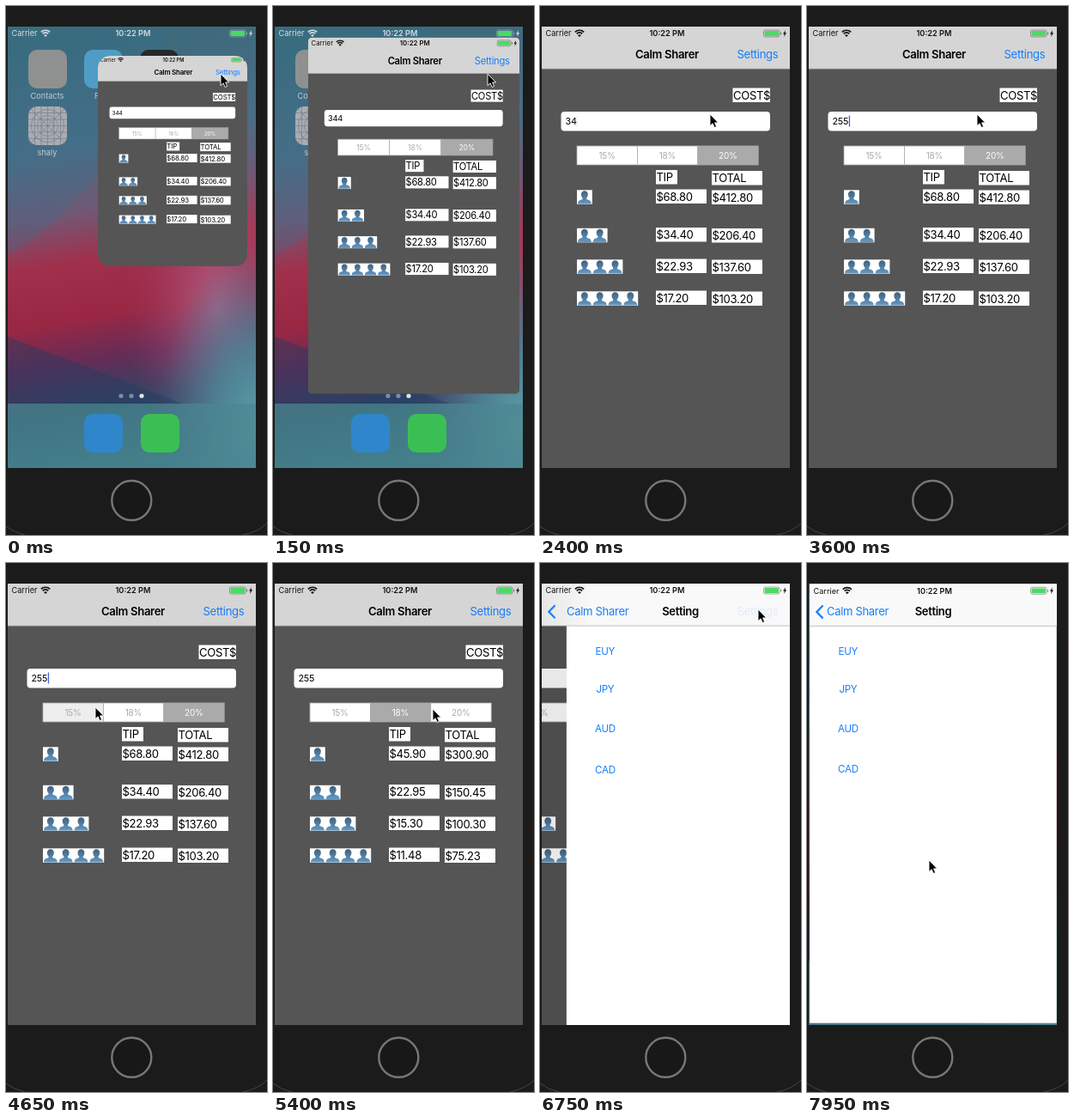
Animation of 304 by 616 pixels, one loop 8000 ms. Source, as an HTML page:

```html
<!DOCTYPE html>
<html lang="en">
<head>
<meta charset="utf-8">
<title>Tip calculator demo</title>
<style>
html, body { margin: 0; width: 100%; height: 100%; overflow: hidden; background: #1b1b1b; }
svg { display: block; width: 304px; height: 616px; }
text { font-family: Inter, Roboto, "Liberation Sans", sans-serif; font-size: 13.1px; letter-spacing: -.025em; white-space: pre; }
.small { font-size: 9.2px; letter-spacing: 0; }
.bold { font-weight: 600; }
.mid { text-anchor: middle; }
.seg { font-size: 10px; }
.entry { font-size: 10.8px; }
.link { fill: #157efb; }
.button { font-size: 11.6px; }
</style>
</head>
<body>
<svg id="stage" viewBox="0 0 304 616" xmlns="http://www.w3.org/2000/svg"></svg>
<script>
const LOOP = 8000, STEP = 150;
const APP = "Calm Sharer";

// time, x, y of the pointer tip
const POINTER = [
  [0, 250, 79], [450, 246, 84], [600, 230, 103], [750, 207, 128], [900, 196, 140],
  [1050, 195, 139], [1200, 196, 138], [1500, 197, 136], [1650, 199, 130], [1800, 198, 126],
  [4200, 150, 150], [4350, 104, 168], [4950, 122, 169], [5100, 146, 170], [5400, 186, 170],
  [5550, 214, 170], [5850, 217, 163], [6000, 231, 120], [6150, 249, 74], [6300, 254, 54],
  [6900, 250, 115], [7050, 216, 300], [7200, 172, 480], [7350, 146, 564], [7500, 143, 571],
  [7800, 145, 540], [7950, 142, 346]
];
// time, typed amount, caret opacity
const ENTRY = [
  [0, "344", 0], [1650, "344", 1], [2100, "344", .5], [2400, "34", .12], [2550, "3", 1],
  [2700, "", 1], [2850, "", .3], [3000, "2", 1], [3300, "25", 1], [3600, "255", 1],
  [4200, "255", .3], [4350, "255", 1], [4800, "255", 0]
];
// time, cost, selected rate, pressed segment
const BILL = [
  [0, 344, 2, -1], [4650, 344, 2, 0], [4800, 255, 0, -1], [5100, 255, 0, 1],
  [5250, 255, 1, -1], [5550, 255, 1, 2], [5700, 255, 2, -1]
];
const PUSH = [[0, 0], [6600, .52], [6750, .9], [6900, .98], [7050, 1]];
const RATES = [15, 18, 20];
const ROWS = [222, 266.5, 303, 340];

const rect = (x, y, w, h, fill, extra = "") =>
  `<rect x="${x}" y="${y}" width="${w}" height="${h}" fill="${fill}" ${extra}/>`;
const text = (x, y, str, cls = "", extra = "") =>
  `<text x="${x}" y="${y}" class="${cls}" ${extra}>${str}</text>`;
const icon = (x, y, fill) => rect(x, y, 45, 45, fill, 'rx="10"');
const label = (x, y, w, str, id = "") =>
  rect(x, y, w, 16.5, "#fff") + text(x + .5, y + 13, str, "", id && `id="${id}"`);

function statusBar(ink) {
  const arc = r => `<path d="M${46 - r * .72} ${35.5 - r * .7}A${r} ${r} 0 0 1 ${46 + r * .72} ${35.5 - r * .7}" fill="none" stroke="${ink}" stroke-width="1.7"/>`;
  return `<g fill="${ink}">` + text(6.5, 35.3, "Carrier", "small") +
    arc(7.2) + arc(4.5) + `<path d="M44 34L46 36L48 34Q46 32.4 44 34Z"/>` +
    text(148, 35.3, "10:22 PM", "small bold mid") +
    rect(260.5, 28, 18.5, 8, "none", `rx="2" stroke="${ink}" stroke-opacity=".45" stroke-width=".8"`) +
    rect(261.6, 29.1, 16.3, 5.8, "#4cd964", 'rx="1"') +
    rect(280, 30.5, 1.1, 3, ink, 'opacity=".45"') +
    `<path d="M286 28L283 32.5H284.8L284 36L287.2 31.3H285.3Z"/></g>`;
}

function homeScreen() {
  let grid = "";
  for (let i = 1; i < 6; i++) {
    const d = i * 7.5;
    grid += `M${26 + d} 117v45M26 ${117 + d}h45`;
  }
  const rings = [7, 12, 19].map(r => `<circle cx="48.5" cy="139.5" r="${r}"/>`).join("");
  const dots = [134, 146, 158].map((x, i) =>
    `<circle cx="${x}" cy="454" r="2.6" fill="#fff" opacity="${i == 2 ? .85 : .4}"/>`).join("");
  return rect(2, 24, 289, 514, "url(#sky)") + rect(2, 24, 289, 514, "url(#rose)") + rect(2, 24, 289, 514, "url(#teal)") +
    `<path d="M2 290Q70 255 130 160L190 24H2Z" fill="#34718c" opacity=".28"/>` +
    `<path d="M2 385Q120 430 205 463H2Z" fill="#273a63" opacity=".45"/>` +
    rect(2, 463, 289, 75, "#4b8791", 'opacity=".72"') +
    statusBar("#d5dcdf") +
    icon(26, 51, "#8e9190") + icon(91, 51, "#4f9dc4") + icon(156, 51, "#26282b") +
    icon(26, 117, "#a9adb3") +
    `<g fill="none" stroke="#73777e" stroke-width=".6"><path d="${grid}M26 117l45 45M71 117l-45 45"/>${rings}</g>` +
    `<g fill="#c3cbd0">` + text(48, 108, "Contacts", "small mid") + text(113, 108, "Files", "small mid") +
    text(48, 174, "shaly", "small mid") + "</g>" + dots +
    icon(91, 475, "#2f86cb") + icon(157, 475, "#3bbf54");
}

function people(n, y) {
  let out = rect(43, y - 8, 17.8 * n, 16.5, "#fff");
  for (let i = 0; i < n; i++)
    out += `<use href="#person" x="${43 + 17.8 * i}" y="${y - 8}"/>`;
  return out;
}

function calculator() {
  let out = rect(2, 24, 289, 514, "#555") + label(224.5, 95.5, 43.5, "COST$") +
    rect(24.5, 123, 243.5, 22.5, "#fff", 'rx="4"') + text(29.5, 138, "", "entry", 'id="entry"') +
    rect(0, 127.5, 1.3, 13, "#3d62dc", 'id="caret"');
  RATES.forEach((r, i) => {
    const x = 43 + i * 70.4;
    out += rect(x, 163, 70.4, 22, "#fff", `id="seg${i}" stroke="#aaa" stroke-width=".8"`) +
      text(x + 35, 177.7, r + "%", "seg mid", `id="rate${i}"`);
  });
  out += label(135, 191, 25, "TIP") + label(200, 192, 59, "TOTAL");
  ROWS.forEach((y, i) => {
    out += people(i + 1, y + .3) + label(135, y - 8.5, 59, "", "tip" + i) + label(200, y - 7.5, 59, "", "sum" + i);
  });
  return out + rect(2, 24, 289, 514, "#000", 'id="shade"');
}

function settings() {
  const names = ["EUY", "JPY", "AUD", "CAD"], ys = [107, 151, 197, 245];
  return rect(2, 24, 289, 514, "#fff") +
    names.map((n, i) => text(47, ys[i], n, "button link mid")).join("");
}

function navBar() {
  return rect(2, 24, 289, 49, "#d5d5d5") +
    rect(2, 24, 289, 49, "#f9f9f9", 'id="tint"') +
    `<g id="edge">${rect(-25, 24, 345, 49, "url(#soft)")}</g>` +
    rect(2, 72.7, 289, .8, "#b4b4b4") + statusBar("#111") +
    text(111, 61, APP, "bold", 'id="title"') +
    text(229.5, 61, "Settings", "link", 'id="open"') +
    `<path id="chevron" d="M17.6 49.2L10.3 56.7L17.6 64.2" fill="none" stroke="#157efb" stroke-width="2.2"/>` +
    text(22, 61, APP, "link", 'id="back"') +
    text(146.5, 61, "Setting", "bold mid", 'id="heading"');
}

const stage = document.getElementById("stage");
stage.innerHTML = `<defs>
  <linearGradient id="sky" x1=".45" y1="0" x2=".55" y2="1">
    <stop offset="0" stop-color="#3b6a7a"/><stop offset=".25" stop-color="#4b6d86"/>
    <stop offset=".4" stop-color="#715874"/><stop offset=".51" stop-color="#a1304c"/>
    <stop offset=".64" stop-color="#992744"/><stop offset=".74" stop-color="#632d57"/>
    <stop offset=".85" stop-color="#284866"/><stop offset="1" stop-color="#33717f"/>
  </linearGradient>
  <radialGradient id="rose" cx=".85" cy=".64" r=".38">
    <stop offset="0" stop-color="#c0739a" stop-opacity=".75"/><stop offset="1" stop-color="#a03a63" stop-opacity="0"/>
  </radialGradient>
  <radialGradient id="teal" cx="1" cy=".9" r=".4">
    <stop offset="0" stop-color="#5b9fa8"/><stop offset=".45" stop-color="#4a8798" stop-opacity=".8"/><stop offset="1" stop-color="#3a6f88" stop-opacity="0"/>
  </radialGradient>
  <linearGradient id="soft" gradientUnits="userSpaceOnUse" x1="-25" y1="0" x2="30" y2="0">
    <stop offset="0" stop-color="#f9f9f9" stop-opacity="0"/><stop offset="1" stop-color="#f9f9f9"/>
  </linearGradient>
  <linearGradient id="blue" x1="0" y1="0" x2="0" y2="1">
    <stop offset="0" stop-color="#40617f"/><stop offset="1" stop-color="#6499c4"/>
  </linearGradient>
  <g id="person"><path d="M1 16.2Q1 12.4 4.2 11.6Q7 11 6.8 9.7C3.8 6.8 4.4 1 8.9 1S14 6.8 11 9.7Q10.8 11 13.6 11.6Q16.8 12.4 16.8 16.2Z" fill="url(#blue)"/></g>
  <clipPath id="window"><rect id="frame"/></clipPath>
  <clipPath id="screen"><rect x="2" y="24" width="289" height="514"/></clipPath>
</defs>
${rect(0, 0, 304, 616, "#1b1b1b")}
<path d="M0 606Q9 613 22 616M304 602Q295 612 276 616" fill="none" stroke="#444" stroke-width="1"/>
<circle cx="146.3" cy="575.8" r="23" fill="#181818" stroke="#777" stroke-width="2.4"/>
${homeScreen()}
<g clip-path="url(#window)"><g id="app"><g clip-path="url(#screen)">
  <g id="main">${calculator()}</g><g id="panel">${settings()}</g>${navBar()}
</g></g></g>
<path id="pointer" d="M0 0V13.6L3.1 10.8L5.2 15.5L7.6 14.4L5.6 9.9H9.7Z" fill="#000" stroke="#fff" stroke-width=".9"/>`;

const $ = id => document.getElementById(id);
const set = (id, attrs) => { for (const k in attrs) $(id).setAttribute(k, attrs[k]); };
const shift = (id, x, y = 0) => set(id, { transform: `translate(${x} ${y})` });
const at = (table, t) => table.filter(row => row[0] <= t).pop().slice(1);
const mix = (a, b, k) => a + (b - a) * k;
const money = v => "$" + (Math.round(v * 100 + 1e-6) / 100).toFixed(2);

function drawWindow(t) {
  const k = t >= 7950 ? .99 : t >= 750 ? 1 : 1 - Math.exp(-t / 150);
  const x = mix(107, 2, k), y = mix(58, 24, k), w = mix(174, 289, k), s = w / 289;
  set("frame", { x, y, width: w, height: mix(245, 514, k), rx: mix(14, 0, k) });
  set("app", { transform: `translate(${x - 2 * s} ${y - 24 * s}) scale(${s})` });
}

function drawBill(t) {
  const [str, caret] = at(ENTRY, t);
  $("entry").textContent = str;
  set("caret", { x: 29.6 + str.length * 6.4, opacity: caret });
  const [cost, chosen, pressed] = at(BILL, t);
  RATES.forEach((r, i) => {
    set("seg" + i, { fill: i == chosen ? "#aaa" : i == pressed ? "#eee" : "#fff" });
    set("rate" + i, { fill: i == chosen ? "#fff" : "#aaa" });
  });
  const tip = cost * RATES[chosen] / 100;
  ROWS.forEach((_, i) => {
    $("tip" + i).textContent = money(tip / (i + 1));
    $("sum" + i).textContent = money((cost + tip) / (i + 1));
  });
}

function drawPush(t) {
  const [p] = at(PUSH, t), rest = 1 - p;
  shift("main", -87 * p);
  shift("panel", 289 * rest);
  shift("edge", p == 1 ? -10 : 320 * rest);
  shift("title", -89 * p);
  shift("back", 89 * rest);
  shift("heading", 170 * rest);
  set("shade", { opacity: .1 * p });
  set("tint", { opacity: p == 1 ? 1 : .6 * p });
  set("edge", { opacity: p ? 1 : 0 });
  set("title", { opacity: Math.max(0, 1 - 1.6 * p) });
  set("open", { opacity: p > .95 ? 0 : rest });
  for (const id of ["back", "chevron", "heading"])
    set(id, { opacity: Math.min(1, p * 1.1) });
}

function draw(now) {
  const t = Math.floor(now % LOOP / STEP) * STEP;
  drawWindow(t);
  drawBill(t);
  drawPush(t);
  shift("pointer", ...at(POINTER, t));
}

const start = performance.now();
function tick() {
  draw(performance.now() - start);
  requestAnimationFrame(tick);
}
tick();
</script>
</body>
</html>
```
